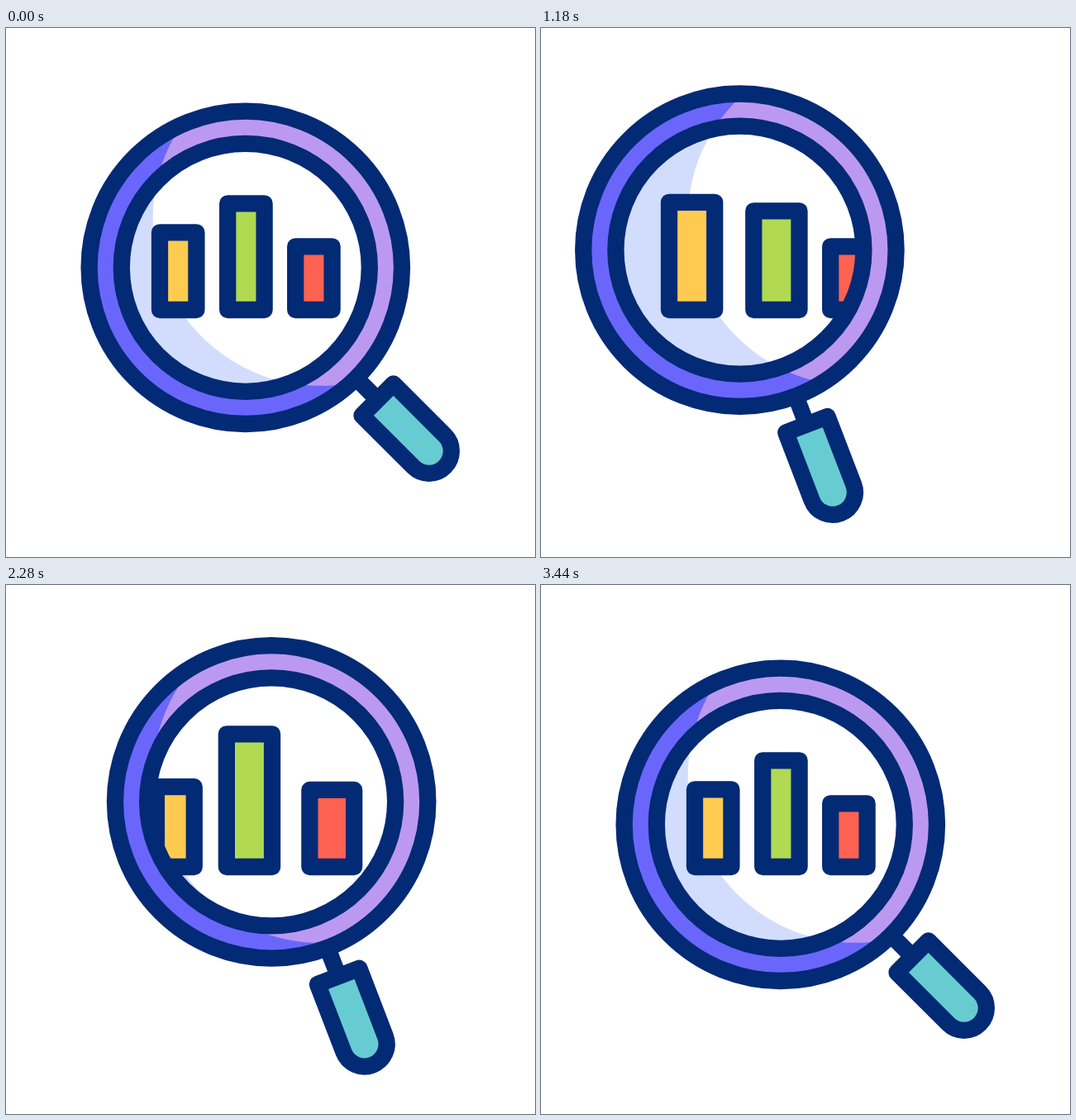
These frames come from a looping animation (640 px wide and 640 px high, 3.6 s). An HTML page with a canvas:

```html
<!DOCTYPE html>
<html lang="en">
<head>
<meta charset="utf-8">
<title>Magnifier over bar chart</title>
<style>
  html, body { margin: 0; height: 100%; overflow: hidden; background: #fff; }
  canvas { display: block; width: 100vw; height: 100vh; }
</style>
</head>
<body>
<canvas id="stage" width="640" height="640"></canvas>
<script>
const ctx = document.getElementById('stage').getContext('2d');
const LOOP = 3600, HOME_END = 3440, MOVE = 400;
const NAVY = '#032a75', RING = 189.2, LENS = 150, BASE = 341;

// Offsets at the four stops: right, left, right, left. Home is always 0.
const PATH = { x: [57, -49.4, 40.7, -47.1], y: [-47.3, -21.1, -26.3, -37] };
const BARS = [
  { x: 208.2, height: 93.7, color: '#fecb50', slide: [-18, -25.6, 0, -25.6], extra: [36.5, 36.5, 0, 24] },
  { x: 290.4, height: 128.7, color: '#b1da52', slide: [5.5, -5.5, 5.5, -5.5], extra: [-54, -9, 32, 32] },
  { x: 372.4, height: 76.7, color: '#ff6250', slide: [25.2, 0, 25.2, 0], extra: [59, 0, 19, 0] },
];

function ease(t, begin, end) {
  const u = Math.min(1, Math.max(0, (t - begin) / (end - begin)));
  return u * u * (3 - 2 * u);
}

// Leaves home at 200, then a stop every 800 ms, and returns home at the end.
function tour(t, stops, homeStart) {
  let value = 0;
  stops.forEach((stop, i) => {
    const begin = i ? 800 * i - 200 : 200;
    value += (stop - value) * ease(t, begin, begin + MOVE);
  });
  return value * (1 - ease(t, homeStart, HOME_END));
}

function circle(x, y, r) {
  ctx.beginPath();
  ctx.arc(x, y, r, 0, 2 * Math.PI);
}

function paint(color) {
  ctx.fillStyle = color;
  ctx.fill();
}

function drawBar({ x, height, color, slide, extra }, t) {
  const move = stops => tour(t + 10, stops, 2950);
  const reach = Math.max(...slide.map(Math.abs));
  const width = 44.4 + 10.8 * move(slide.map(s => Math.abs(s) / reach));
  const tall = height + move(extra);
  ctx.beginPath();
  ctx.rect(x + move(slide) - width / 2, BASE - tall, width, tall);
  paint(color);
  ctx.stroke();
}

// A shaded disc whose lit area stays fixed on the stage.
function glass(x, y, r, shade, light, drawContent) {
  ctx.save();
  circle(x, y, r);
  paint(shade);
  ctx.clip();
  circle(380, 230.5, 202.3);
  paint(light);
  drawContent?.();
  ctx.restore();
  circle(x, y, r);
  ctx.stroke();
}

function drawHandle(x, y, angle) {
  ctx.save();
  ctx.translate(x, y);
  ctx.rotate(angle * Math.PI / 180);
  ctx.beginPath();
  ctx.moveTo(RING, 0);
  ctx.lineTo(226, 0);
  ctx.stroke();
  ctx.beginPath();
  ctx.moveTo(226, -27);
  ctx.arc(314, 0, 27, -Math.PI / 2, Math.PI / 2);
  ctx.lineTo(226, 27);
  ctx.closePath();
  paint('#67ccd1');
  ctx.stroke();
  ctx.restore();
}

function draw(t) {
  const x = 289.8 + tour(t, PATH.x, 3010);
  const y = 289.8 + tour(t, PATH.y, 3020);
  const tilt = 24 * ease(t, 200, 600) * (1 - ease(t, 2975, HOME_END));

  ctx.fillStyle = '#fff';
  ctx.fillRect(0, 0, 640, 640);
  ctx.strokeStyle = NAVY;
  ctx.lineWidth = 20.3;
  ctx.lineJoin = 'round';

  drawHandle(x, y, 45 + tilt);
  glass(x, y, RING, '#6a66fb', '#bb99f1');
  glass(x, y, LENS, '#d2ddfd', '#fff', () => BARS.forEach(bar => drawBar(bar, t)));
}

const start = performance.now();
function tick() {
  draw((performance.now() - start) % LOOP);
  requestAnimationFrame(tick);
}
tick();
</script>
</body>
</html>
```
